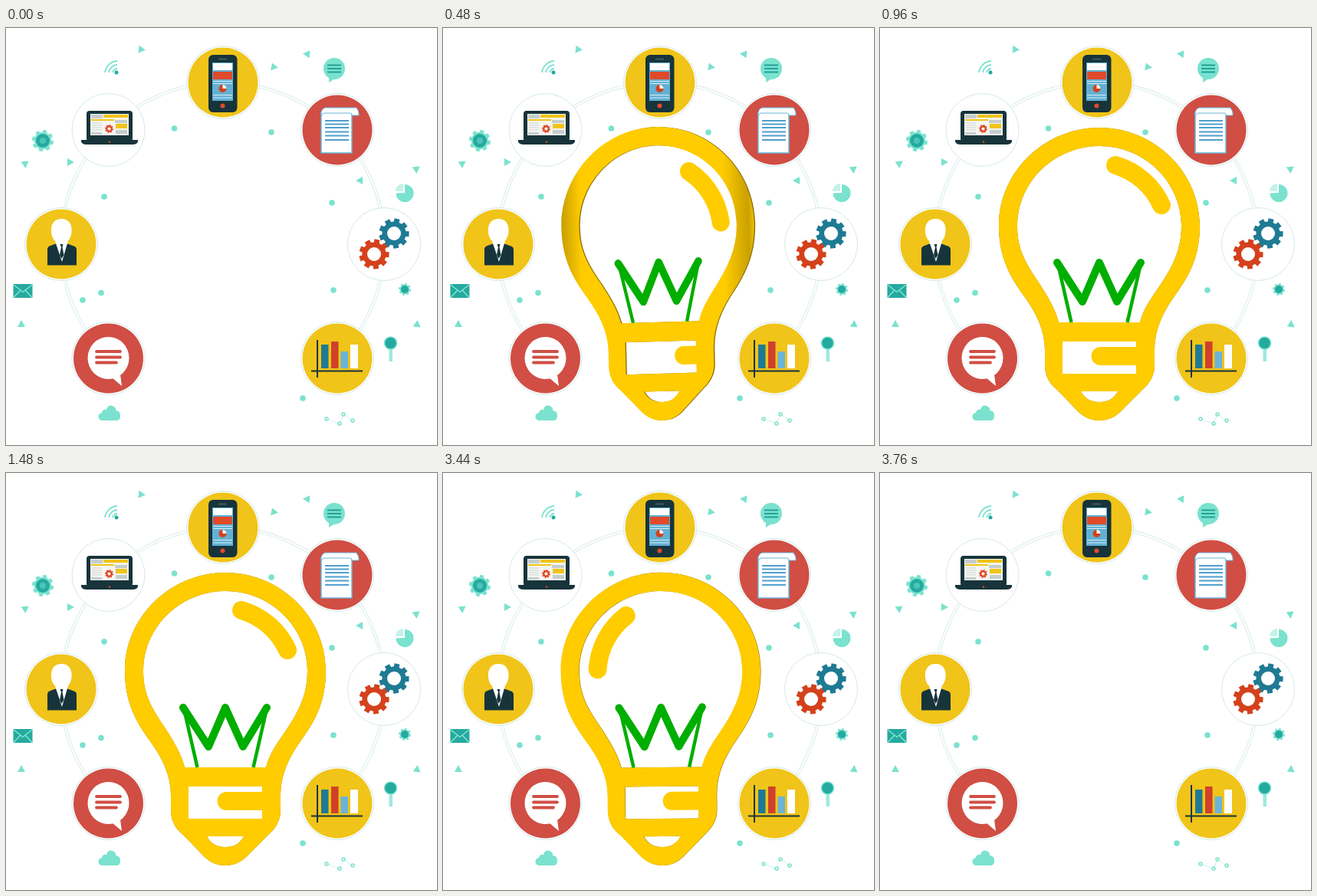
These frames come from a looping animation (562 px wide and 544 px high, 4000 ms). An HTML page:

```html
<!DOCTYPE html>
<html lang="en">
<head>
<meta charset="utf-8">
<title>Light bulb and icons</title>
<style>
html, body { margin: 0; width: 100%; height: 100%; overflow: hidden; background: #fff; }
svg { display: block; width: 562px; height: 544px; }
</style>
</head>
<body>
<svg viewBox="0 0 562 544" xmlns="http://www.w3.org/2000/svg">
  <defs>
    <linearGradient id="shade" gradientUnits="userSpaceOnUse" x1="155" x2="417" y1="0" y2="0">
      <stop offset="0" stop-color="#5c4800" stop-opacity=".75"/>
      <stop offset=".1" stop-color="#5c4800" stop-opacity="0"/>
      <stop offset=".84" stop-color="#5c4800" stop-opacity="0"/>
      <stop offset=".97" stop-color="#5c4800" stop-opacity=".7"/>
      <stop offset="1" stop-color="#5c4800" stop-opacity=".2"/>
    </linearGradient>
    <clipPath id="slot"><rect x="238" y="409" width="96.500" height="42"/></clipPath>
    <path id="shell" fill-rule="evenodd" d="M286 130C358 130 417 188 417 258C417 300 402 325 384 350C368 372 358 395 358 420V440C358 455 350 465 342 472L317 497Q304 512 286 512Q268 512 255 497L231 472C222 465 215 455 215 440V420C215 395 204 372 188 350C170 325 155 300 155 258C155 188 214 130 286 130Z
      M286 154C345 154 393 201 393 258C393 290 381 312 365 336C351 356 343 368 339 384H233C229 368 220 352 207 332C191 308 179 290 179 258C179 201 227 154 286 154Z
      M238 409H334V451H238ZM262 474H310Q303 488 286 488Q269 488 262 474Z"/>
  </defs>

  <g fill="none">
    <path d="M133 431A211 211 0 1 1 432 431" stroke="#d3e9e7" stroke-width="4"/>
    <path d="M133 431A211 211 0 1 1 432 431" stroke="#fff" stroke-width="2.400"/>
  </g>
  <g id="discs"></g>

  <g id="phone">
    <rect x="264" y="35" width="37.500" height="75" rx="6" fill="#17343b"/>
    <rect x="269" y="45" width="27" height="50" fill="#62b1d3"/>
    <path d="M270 46h25v9h-25z" fill="#fff"/>
    <path d="M270 57h25v10h-25z" fill="#e04a2a"/>
    <path d="M270 69.500h25M270 72.500h25M270 87.500h25M270 91h25" stroke="#d8edf5"/>
    <circle cx="282.500" cy="79" r="5" fill="#d4411c"/>
    <path d="M282.500 79v-5a5 5 0 0 1 5 5z" fill="#fff"/>
    <path d="M277 40.500h11" stroke="#4a656b" stroke-width="1.500"/>
    <circle cx="282.500" cy="101.500" r="3" fill="#e04a2a"/>
  </g>

  <g id="laptop">
    <rect x="105" y="108" width="60" height="40" rx="4" fill="#17343b"/>
    <path d="M110 112h50v28h-50z" fill="#f5f5f0"/>
    <path d="M111 113h15v5h-15zM142 120h16v4h-16zM111 136h14v3h-14zM143 133h15v5h-15z" fill="#c5cdcd"/>
    <path d="M127 113h32v4h-32zM111 119h30v2h-30zM143 125h15v6h-15z" fill="#f0c419"/>
    <path d="M112 124h13M112 127h13M112 130h13M112 133h13" stroke="#cfd5d5"/>
    <path d="M98 146h74v2q-1 4-7 4h-60q-6 0-7-4z" fill="#17343b"/>
    <circle cx="135" cy="148.500" r="1.200" fill="#e04a2a"/>
  </g>

  <g id="page">
    <path d="M411 110h40v53h-40z" fill="#fff" stroke="#6bb4d8" stroke-width="1.500"/>
    <path d="M416 104h41q4 5 3 10h-9q0-3-2-3h-34q-3 0-4 4q-1-9 5-11z" fill="#fff" stroke="#6bb4d8"/>
    <path d="M416 121h31M416 125.500h31M416 130h31M416 135.500h31M416 140.500h31M416 146h31" stroke="#4f9fcd" stroke-width="1.800"/>
  </g>

  <g id="chart">
    <path d="M411 413h9.500v31h-9.500z" fill="#1f7a94"/>
    <path d="M424 409h9.500v35h-9.500z" fill="#d0402a"/>
    <path d="M436.500 422h9.500v22h-9.500z" fill="#6bb4d8"/>
    <path d="M449 413h10v31h-10z" fill="#fff"/>
    <path d="M406 407v49M398 447.500h67" stroke="#17343b" stroke-width="2"/>
  </g>

  <g id="chat">
    <path d="M138 456l13 11-2-15z" fill="#fff"/>
    <ellipse cx="133.500" cy="430.500" rx="27" ry="27.500" fill="#fff"/>
    <path d="M118 422h31M118 429.500h31M118 436.500h26" stroke="#d04e44" stroke-width="3.800" stroke-linecap="round"/>
  </g>

  <g id="person">
    <path d="M72.500 249c9 0 14 7 13 17-.5 6-3 10-5 12v7h-16v-7c-3-2-5-6-5.500-12-1-10 4-17 13.500-17z" fill="#fff"/>
    <path d="M54 309.500V289q0-4 4-5l8-3h13l8 3q5 1 5 5v20.500z" fill="#17343b"/>
    <path d="M65 281h15l-7 24z" fill="#fff"/>
    <path d="M70.500 282h4l-1 4 2 10-3 5-2.500-5 2-10z" fill="#17343b"/>
  </g>

  <g id="cogs"></g>

  <g id="bits" fill="#7ae2ce">
    <g id="scatter"></g>
    <g fill="none" stroke="#7ae2ce" stroke-width="1.800">
      <path d="M129 58A17 17 0 0 1 145 43M134 58A12 12 0 0 1 145 48M139 58A7 7 0 0 1 145 53"/>
    </g>
    <circle cx="144" cy="58" r="2.500" fill="#25aaa0"/>
    <circle cx="428" cy="53" r="14"/>
    <path d="M421 62v9l8-5z"/>
    <path d="M419 48.500h18M419 53h18M419 57.500h18" stroke="#1fa39a" stroke-width="1.800"/>
    <path d="M520 215V204a11.500 11.500 0 1 1-11.500 11.500z"/>
    <path d="M518 213h-10a10 10 0 0 1 10-10z" fill="#c3f3e8"/>
    <path d="M9.500 334h25v18h-25z" fill="#25aaa0"/>
    <path d="M10 335l12 9.500L34 335M10 351.500l8.500-9M34 351.500l-8.500-9" fill="none" stroke="#8be7d6" stroke-width="1.300"/>
    <path d="M499.500 419h4.500v16h-4.500z" fill="#9deadc"/>
    <circle cx="501.500" cy="411" r="8" fill="#25aaa0" stroke="#7ae2ce" stroke-width="1.500"/>
    <path d="M126 512a5 5 0 0 1-1-10q1-5 6-4q2-7 8-5q5 2 4 6q6 0 6 7q0 6-5 6z"/>
    <path d="M418 510L435 516L440 504L452 512" fill="none" stroke="#c6eee6" stroke-width=".8"/>
    <g fill="#fff" stroke="#7ae2ce" stroke-width="1.500">
      <circle cx="418" cy="510" r="2"/><circle cx="435" cy="516" r="2"/>
      <circle cx="440" cy="504" r="2"/><circle cx="452" cy="512" r="2"/>
    </g>
  </g>

  <g id="bulb" fill="#fc0">
    <use id="edge" href="#shell" fill="#8a6c00"/>
    <use href="#shell"/>
    <use id="tone" href="#shell" fill="url(#shade)"/>
    <g clip-path="url(#slot)"><rect id="bar" x="275.500" y="416" width="90" height="24" rx="12"/></g>
    <g id="filament" fill="none" stroke="#00ae00" stroke-linecap="round" stroke-linejoin="round">
      <path d="M233 312L249.500 384M339 312L322.500 384" stroke-width="4.500" stroke-linecap="butt"/>
      <path d="M231 306L264 357L286 306L309 357L340 306" stroke-width="10"/>
    </g>
    <path id="glint" d="M307 179A95 95 0 0 1 367 231" fill="none" stroke="#fc0" stroke-width="24" stroke-linecap="round"/>
  </g>
</svg>
<script>
const el = id => document.getElementById(id);
const add = (id, markup) => { el(id).innerHTML += markup; };

function cog(x, y, r, hole, teeth, color, center = "#fff") {
  const size = r * 0.36;
  let out = "";
  for (let i = 0; i < teeth; i++) {
    out += `<rect x="${x - size / 2}" y="${y - r}" width="${size}" height="${r}" transform="rotate(${360 * i / teeth + 12} ${x} ${y})"/>`;
  }
  return `<g fill="${color}">${out}<circle cx="${x}" cy="${y}" r="${r * 0.8}"/><circle cx="${x}" cy="${y}" r="${hole}" fill="${center}"/></g>`;
}

const yellow = "#f0c419", red = "#d04e44", mint = "#7ae2ce", teal = "#25aaa0";
[[283, 71, yellow], [133.5, 133, "#fff"], [72, 282, yellow], [133.5, 431, red],
 [432, 431, yellow], [493, 282, "#fff"], [432, 133, red]].forEach(([x, y, color]) => add("discs",
  `<circle cx="${x}" cy="${y}" r="47.5" fill="#fff" stroke="#d3e9e7"/><circle cx="${x}" cy="${y}" r="45.5" fill="${color}"/>`));

add("cogs", cog(506, 268, 19.5, 9, 9, "#1f7a94") + cog(480, 295, 19.5, 9, 9, "#d4411c") +
  cog(134.5, 131.5, 5.5, 2, 8, "#e04a2a") +
  cog(48, 147, 14, 9, 8, mint, teal) + cog(48, 147, 5, 4, 8, teal, "#4cc5b6") +
  cog(520, 341, 8, 5, 8, mint, teal));

[[219.5, 131], [346, 136], [128, 220], [425, 228], [100, 355], [124, 345.5], [427, 342], [387, 483]]
  .forEach(([x, y]) => add("scatter", `<circle cx="${x}" cy="${y}" r="3.8"/>`));
[[177, 28, 95], [350, 51, 100], [392, 34, -85], [25, 178, 175], [84, 175, 90],
 [461, 199, -90], [535, 185, 175], [20, 386, 0], [536, 386, 5]]
  .forEach(([x, y, turn]) => add("scatter", `<path d="M-5 4L0-5L5 4Z" transform="translate(${x} ${y}) rotate(${turn})"/>`));

const LOOP = 4000, STEP = 40, SPAN = 760, ENTER = 240, LEAVE = 3000;
const show = (id, on) => el(id).setAttribute("visibility", on ? "inherit" : "hidden");

function render(time) {
  const t = Math.floor(time % LOOP / STEP) * STEP;
  const leaving = t >= LEAVE;
  const away = leaving ? Math.min(1, (t - LEAVE) / SPAN)
    : Math.max(0, Math.min(1, (ENTER + SPAN - t) / SPAN));
  // Sideways turn: decelerates on entry, accelerates on exit.
  const turn = away ** (leaving ? 3.17 : 2);
  const sx = Math.cos(turn * 35 * Math.PI / 180);
  const lean = 0.05 * turn, slope = -0.06 * turn;
  const sy = 1 + 0.01 * turn ** 2;

  el("bulb").setAttribute("visibility", t >= ENTER && t < LEAVE + SPAN ? "visible" : "hidden");
  el("bulb").setAttribute("transform",
    `translate(286 512) matrix(${sx} ${slope} ${lean} ${sy} 0 0) translate(-286 -512)`);
  el("edge").setAttribute("transform", `translate(${3 * turn} 0)`);
  el("tone").setAttribute("opacity", Math.max(0, (turn - 0.18) / 0.62));

  const slide = (leaving ? 124 : 82) * turn ** 1.35;
  el("bar").setAttribute("transform", `translate(${slide} 0)`);
  const swing = leaving ? -305 * away ** 2 : 37 * turn;
  el("glint").setAttribute("transform", `rotate(${swing} 286 259)`);
  show("glint", away < 0.75);
  show("filament", away < 0.8);
}

const start = performance.now();
function tick() {
  render(performance.now() - start);
  requestAnimationFrame(tick);
}
render(0);
requestAnimationFrame(tick);
</script>
</body>
</html>
```
